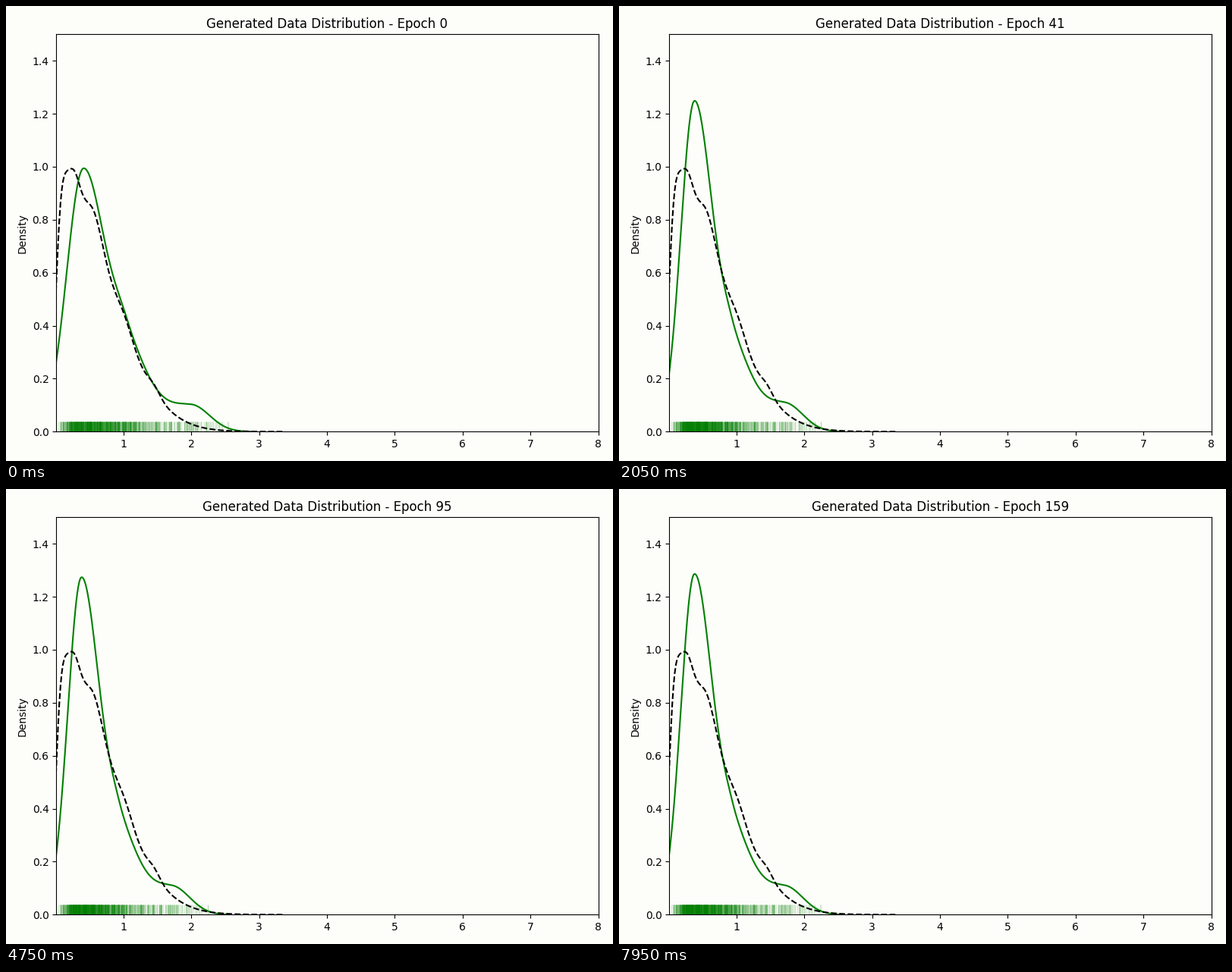
A matplotlib script for the animation above (8000 ms loop, 800 px wide and 600 px high).

```python
import math

import numpy as np
import matplotlib.pyplot as plt
from matplotlib.animation import FuncAnimation

FRAMES, STEP_MS = 160, 50
RUG_COUNT, RUG_HEIGHT = 1000, 0.0375
PAPER = "#fdfdfa"

# Every hump is (centre, height, left width, right width).
START = np.array([(.41, .99, .247, .33), (1.05, .265, .22, .32), (2, .1, .45, .27)])
NARROW = np.array([(.285, 1.42, .188, .21), (.74, .355, .17, .3), (1.5, .106, .34, .33)])
SETTLED = np.array([(.38, 1.243, .2, .265), (.94, .28, .2, .28), (1.72, .105, .36, .26)])
RIPPLES = [(.28, .05, .07, .07), (.58, .08, .1, .12), (1.02, .04, .12, .12), (1.45, .025, .09, .09)]


def humps(x, rows):
    """Sum of bell curves whose two sides may differ in width."""
    return sum(h * np.exp(-.5 * ((x - c) / np.where(x < c, left, right)) ** 2)
               for c, h, left, right in rows)


def ease(t):
    return (1 - np.cos(np.pi * np.clip(t, 0, 1))) / 2


def real_density(x):
    """Half-normal with ripples and a blurred edge at zero."""
    edge = .5 + .5 * np.vectorize(math.erf)(x / (.065 * math.sqrt(2)))
    return edge * (np.exp(-.5 * (x / .75) ** 2) + humps(x, RIPPLES))


def fake_density(x, epoch):
    rows = START + (NARROW - START) * ease(epoch / 23)
    rows = rows + (SETTLED - NARROW) * ease((epoch - 23) / 18)
    rows[0, 1] *= 1 + .02 * ease((epoch - 41) / 20) + .01 * ease((epoch - 120) / 40)
    return humps(x, rows)


grid = np.linspace(0, 3.4, 500)
real_x = np.linspace(-.195, 3.35, 200)
shares = np.random.default_rng(4).random(RUG_COUNT)


def rug_spots(y):
    """Samples of the curve, thinned out towards zero."""
    total = np.cumsum(y * ease(grid / .2))
    return np.interp(shares, total / total[-1], grid)


fig, ax = plt.subplots(figsize=(8, 6), dpi=100, facecolor=PAPER)
ax.set(xlim=(.01, 8), ylim=(0, 1.5), ylabel="Density", facecolor=PAPER)
title = ax.set_title("Generated Data Distribution - Epoch 0")
fig.tight_layout()

rug = ax.vlines([], 0, RUG_HEIGHT, color="green", alpha=.15, linewidth=1)
green, = ax.plot([], [], color="green", lw=1.5)
ax.plot(real_x, real_density(real_x), color="black", lw=1.5, ls="--")


def draw(epoch):
    y = fake_density(grid, epoch)
    seen = y > 5e-4
    green.set_data(grid[seen], y[seen])
    rug.set_segments([[(x, 0), (x, RUG_HEIGHT)] for x in rug_spots(y)])
    title.set_text(f"Generated Data Distribution - Epoch {epoch}")
    return green, rug, title


anim = FuncAnimation(fig, draw, frames=FRAMES, interval=STEP_MS, repeat=True)
plt.show()
```
